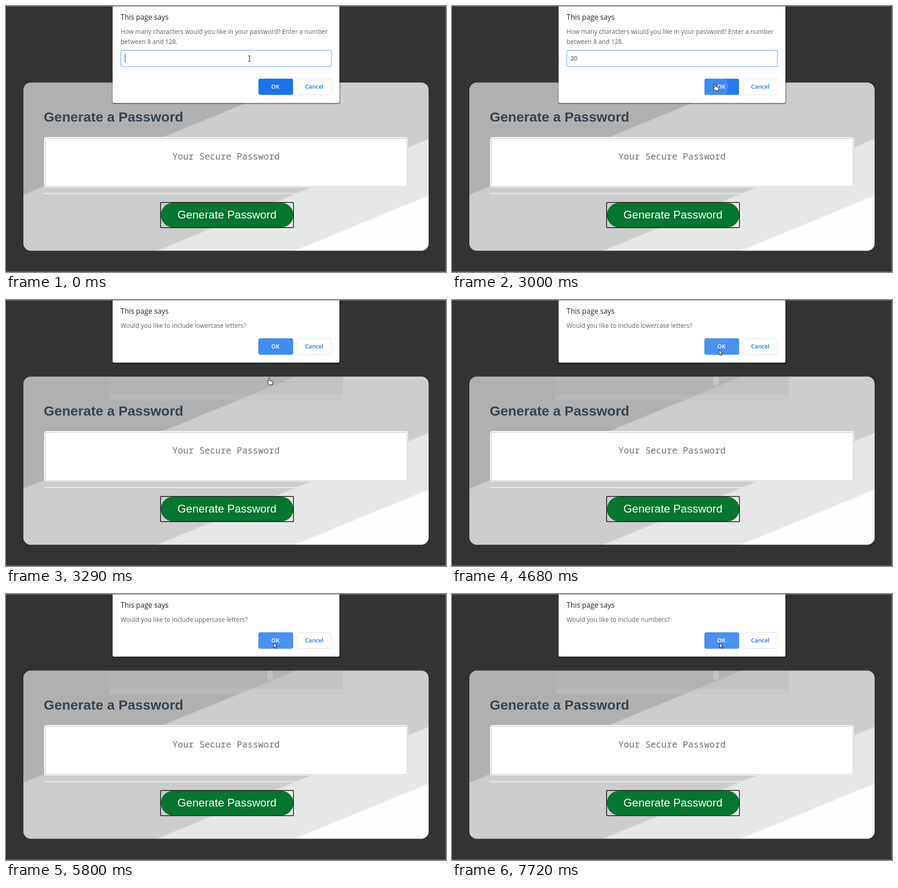
Animation of 962 by 582 pixels, one loop 8 s. Source, as an HTML page:

```html
<!DOCTYPE html>
<html lang="en">
<head>
<meta charset="utf-8">
<title>Password prompt</title>
<style>
  html, body { margin: 0; width: 100%; height: 100%; overflow: hidden; background: #333; }
  svg { display: block; width: 962px; height: 582px; }
  text { white-space: pre; }
  .head { font: bold 30px "Liberation Sans", Arial, sans-serif; fill: #384551; }
  .title { font: bold 47px "Liberation Sans", Arial, sans-serif; fill: #fff; text-anchor: middle; }
  .hint { font: 19.55px "Noto Sans Mono", monospace; fill: #707070; text-anchor: middle; }
  .go { font: 24.5px "Liberation Sans", Arial, sans-serif; fill: #fff; text-anchor: middle; }
  .says { font: 15.65px "Open Sans", sans-serif; fill: #202124; }
  .msg { font: 13.6px "Open Sans", sans-serif; fill: #5f6368; }
  .typed { font: 12.8px "Open Sans", sans-serif; fill: #333; }
  .btn { font: 600 12.6px "Open Sans", sans-serif; text-anchor: middle; }
  .cursor { stroke: #000; stroke-width: 1; stroke-linejoin: round; fill: #fff; }
</style>
</head>
<body>
<svg viewBox="0 0 962 582">
  <defs>
    <linearGradient id="bands" gradientUnits="userSpaceOnUse" x1="0" y1="0" x2="352.2" y2="854.9">
      <stop offset=".4265" stop-color="#b0b0b0"/><stop offset=".4305" stop-color="#cdcdcd"/>
      <stop offset=".6695" stop-color="#cdcdcd"/><stop offset=".6735" stop-color="#e6e8e7"/>
      <stop offset=".7935" stop-color="#e6e8e7"/><stop offset=".7975" stop-color="#fefefe"/>
    </linearGradient>
  </defs>

  <rect width="962" height="582" fill="#333"/>
  <text class="title" x="481.5" y="104">Password Generator</text>
  <rect x="38" y="167.5" width="886" height="368" rx="16" fill="url(#bands)"/>
  <g id="trace">
    <rect x="226" y="168" width="511" height="39" fill="#b8b8b8" opacity=".5"/>
    <rect x="226" y="207" width="511" height="12" fill="#c2c2c2" opacity=".45"/>
    <rect id="spot" x="571" y="168" width="12" height="19" fill="#fff" opacity=".2"/>
  </g>
  <text class="head" x="82.5" y="253">Generate a Password</text>
  <rect x="83.5" y="287" width="795.5" height="110" rx="5" fill="#fff" stroke="#ccc"/>
  <rect x="84.2" y="287.7" width="794" height="108.6" rx="4" fill="none" stroke="#fff" stroke-width="1.4"/>
  <rect x="86" y="289.5" width="791" height="105.5" rx="3" fill="#fff" stroke="#b5b5b5"/>
  <text class="hint" x="481" y="336">Your Secure Password</text>
  <rect x="82" y="409" width="797" height="2.5" fill="#e6e8e7"/>
  <rect x="338.5" y="430.5" width="290" height="54" rx="27" fill="#05752f"/>
  <rect x="338" y="429.7" width="290.5" height="55.3" rx="2" fill="none" stroke="#000" stroke-width="1.5"/>
  <text class="go" x="483" y="465">Generate Password</text>

  <g id="dialogs"></g>

  <path id="beam" class="cursor" style="fill:none" d="M-3-5.5h2.5L0-5 .5-5.5H3M0-5V6M-3 6.5h2.5L0 6l.5.5H3"/>
  <path id="hand" class="cursor" d="M0 1.5a1.5 1.5 0 0 1 3 0V6l5 1.2q2 .6 1.7 2.6L9 15H2.5L-1.8 10q-.8-1.6.8-1.8L0 9z"/>
  <path id="arrow" class="cursor" d="M0 0v11l2.5-2.4 1.8 4.2 1.9-.8-1.8-4.1H8z"/>
  <path d="M0 .5H961.5V581.5H0" fill="none" stroke="#777"/>
</svg>

<script>
const LOOP = 8000;
const $ = id => document.getElementById(id);
const show = (el, on) => { el.style.display = on ? '' : 'none'; };

// Latest entry whose start time has passed
const at = (list, t) => list.filter(e => e[0] <= t).pop() || [0, null];

function buttons(y, focused) {
  const fill = focused ? '#418cec' : '#1a73e8';
  const ring = focused
    ? `<rect x="551.2" y="${y - .8}" width="77.2" height="37" rx="5" fill="#b5d3fa"/>` : '';
  return `${ring}
    <clipPath id="clip${y}"><rect x="552" y="${y}" width="75.6" height="35.5" rx="4"/></clipPath>
    <rect class="ok" x="552" y="${y}" width="75.6" height="35.5" rx="4" fill="${fill}"/>
    <circle class="ripple" fill="#fff" clip-path="url(#clip${y})"/>
    <text class="btn" x="589" y="${y + 22}" fill="#fff">OK</text>
    <rect x="636.5" y="${y + .5}" width="75" height="35" rx="4" fill="#fff" stroke="#dadce0"/>
    <text class="btn" x="674" y="${y + 22}" fill="#1a73e8">Cancel</text>`;
}

function dialog(id, height, lines, body) {
  const msg = lines.map((s, i) => `<text class="msg" x="250.5" y="${60.5 + 22 * i}">${s}</text>`).join('');
  return `<g id="${id}">
    <rect x="232" y="-30" width="499" height="${height + 32.5}" rx="4" fill="#000" opacity=".35"/>
    <rect x="233" y="-30" width="496" height="${height + 30}" rx="3" fill="#fff"/>
    <text class="says" x="250.5" y="29.5">This page says</text>${msg}${body}</g>`;
}

const ask = (id, what) =>
  dialog(id, 137, [`Would you like to include ${what}?`], buttons(84, true).replaceAll('clip84', 'clip-' + id));

$('dialogs').innerHTML =
  dialog('length', 212,
    ['How many characters would you like in your password? Enter a number', 'between 8 and 128.'],
    `<rect x="251" y="97" width="460.5" height="35.5" rx="3" fill="#fff" stroke="#a4c6f6" stroke-width="2"/>
     <text id="typed" class="typed" x="259.5" y="119"></text>
     <rect id="caret" y="105" width="1" height="18" fill="#000"/>` + buttons(159, false)) +
  ask('lower', 'lowercase letters') + ask('upper', 'uppercase letters') + ask('digits', 'numbers');

// Poses: opacity, vertical shift, scale
const REST = [1, 0, 1], LIFT = [.97, -5.5, 1.002], GONE = [.3, -17, 1.018],
      HINT = [.05, -17, 1], DROP = [.84, -6, 1.003];

const poses = {
  length: [[0, REST], [3150, GONE], [3290, null]],
  lower: [[3150, DROP], [3290, REST], [5550, LIFT], [5670, GONE], [5800, null]],
  upper: [[5550, HINT], [5670, DROP], [5800, REST], [7450, LIFT], [7600, GONE], [7720, null]],
  digits: [[7450, HINT], [7600, DROP], [7720, REST]]
};

// Ripples: start, end, x, y, radius
const ripples = {
  length: [3000, 3150, 577, 177, 27],
  lower: [5400, 5550, 585, 107.5, 11.5],
  upper: [7330, 7450, 585, 107.5, 18]
};

const typing = [[0, ''], [1250, '2'], [1510, '20']];
const carets = [[0, 260], [430, null], [990, 260], [1250, 267], [1510, 274], [2060, null], [2460, 274], [3000, null]];

const pointer = [
  [0, 'beam', 532.5, 114.5], [2060, 'beam', 540, 121], [2185, 'arrow', 549, 136],
  [2310, 'arrow', 555.5, 146], [2460, 'arrow', 565, 155], [2580, 'hand', 571.5, 167],
  [2700, 'hand', 573.5, 170.5], [4010, 'arrow', 574, 150], [4130, 'arrow', 575, 124],
  [4280, 'arrow', 580, 117], [4410, 'arrow', 582.5, 113], [4560, 'arrow', 583, 111],
  [4680, 'arrow', 584, 109], [4810, 'arrow', 585, 108], [4930, 'arrow', 585, 107]
];

function drawDialog(id, t) {
  const el = $(id), pose = at(poses[id], t)[1];
  show(el, pose);
  if (!pose) return;
  const [alpha, dy, k] = pose;
  el.setAttribute('opacity', alpha);
  el.setAttribute('transform', `translate(${481 * (1 - k)} ${dy}) scale(${k})`);

  const hover = id === 'length' ? t >= 2580 : t >= 4280;
  const colors = id === 'length' ? ['#1a73e8', '#267aeb'] : ['#418cec', '#4a90ee'];
  el.querySelector('.ok').setAttribute('fill', colors[+hover]);

  const [from, to, x, y, r] = ripples[id] || [0, 0, 0, 0, 0];
  const ripple = el.querySelector('.ripple');
  show(ripple, t >= from && t < to);
  Object.entries({ cx: x, cy: y, r, opacity: .12 }).forEach(([n, v]) => ripple.setAttribute(n, v));
}

function render(t) {
  Object.keys(poses).forEach(id => drawDialog(id, t));
  $('typed').textContent = at(typing, t)[1];
  const x = at(carets, t)[1];
  show($('caret'), x !== null);
  if (x !== null) $('caret').setAttribute('x', x);

  const [, kind, px, py] = at(pointer, t);
  for (const id of ['beam', 'hand', 'arrow']) show($(id), id === kind);
  $(kind).setAttribute('transform', `translate(${px} ${py})`);

  show($('trace'), t >= 3150);
  show($('spot'), t >= 4010);
}

const start = performance.now();
function tick() {
  render((performance.now() - start) % LOOP);
  requestAnimationFrame(tick);
}
tick();
</script>
</body>
</html>
```
